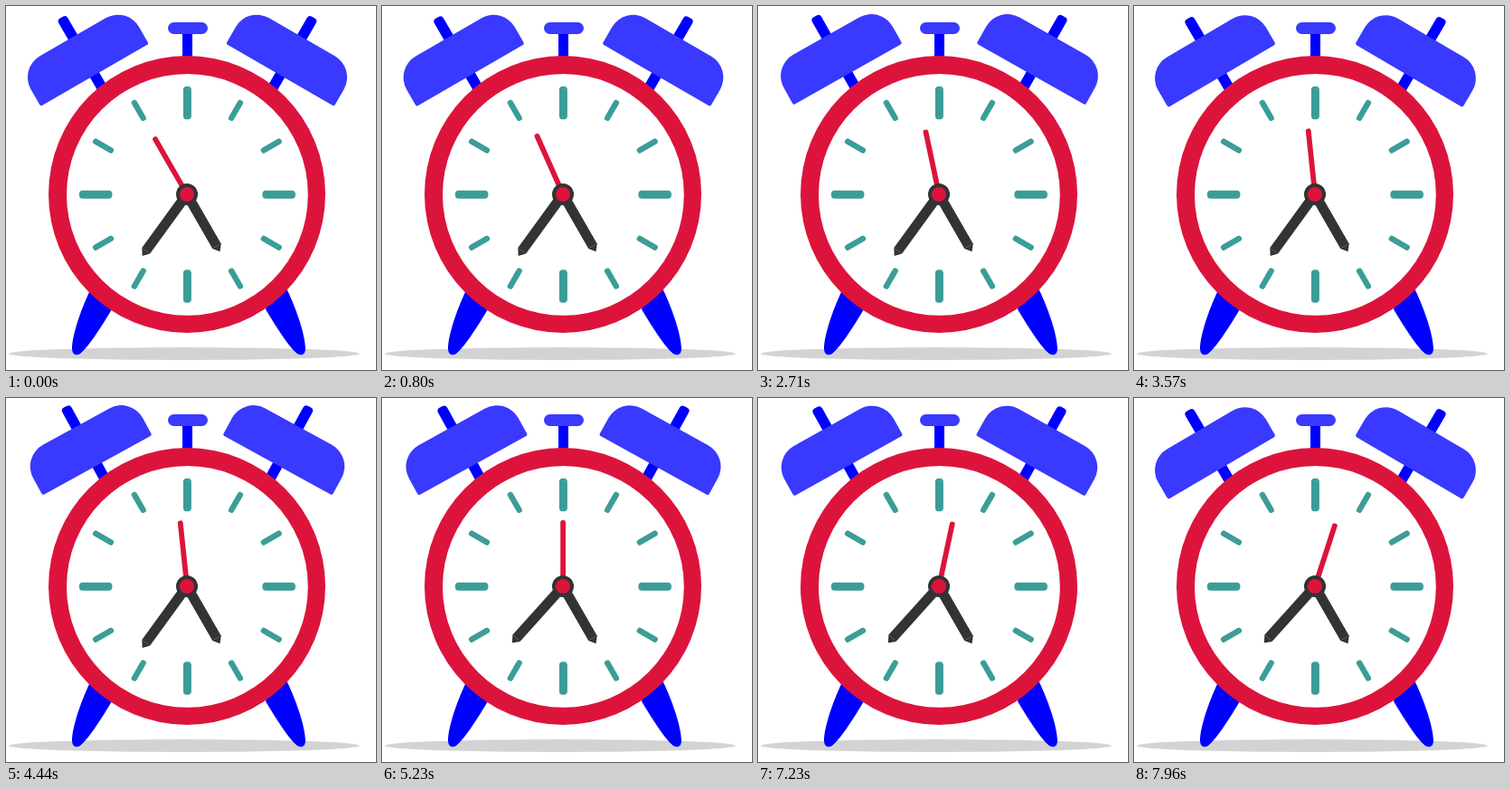
An HTML page for the animation above (8 s loop, 409x402 px).

```html
<!DOCTYPE html>
<html lang="en">
<head>
<meta charset="utf-8">
<title>Alarm clock</title>
<style>
  html, body { margin: 0; height: 100%; overflow: hidden; background: #fff; }
  svg { display: block; width: 100vw; height: 100vh; }
  .deep { fill: #00f; }
  .soft { fill: #3939ff; }
  .red { fill: #dc143c; }
  .tick { fill: #3b9d98; }
  .hand { fill: #333; }
  .seam { stroke: #777; stroke-width: .6; }
</style>
</head>
<body>
<svg viewBox="0 0 409 402">
  <defs>
    <g id="bell" transform="translate(97.8 75.9) rotate(-30)">
      <rect class="deep" x="-5.8" y="-73" width="11.6" height="100" rx="4"/>
      <path class="soft" d="M-69-2V-21a27 27 0 0 1 27-27H42a27 27 0 0 1 27 27V-2q0 2.5-2 2.5H-67q-2 0-2-2.5z"/>
    </g>
    <path id="leg" class="deep" d="M93.5 313C85 330 73 362 73 379Q74 388 82 384C92 376 106 353 117 335L112 310z"/>
  </defs>

  <ellipse cx="197" cy="384" rx="194" ry="7" fill="#d3d3d3"/>
  <use href="#leg"/>
  <use href="#leg" transform="translate(404 0) scale(-1 1)"/>

  <g id="leftBell"><use href="#bell"/></g>
  <g transform="translate(401 0) scale(-1 1)"><g id="rightBell"><use href="#bell"/></g></g>

  <rect class="deep" x="195" y="28" width="11" height="32"/>
  <rect class="soft" x="179" y="18" width="44" height="13" rx="6.5"/>

  <circle class="red" cx="200" cy="208" r="153"/>
  <circle cx="200.4" cy="208.4" r="133.4" fill="#fff"/>
  <g id="ticks" transform="translate(200.4 208.2)"></g>

  <g transform="translate(200 208)">
    <g transform="rotate(150)">
      <path class="hand" d="M-5.5 0V-66L0-73L5.5-66V0z"/>
      <path class="seam" d="M-4-66H4"/>
    </g>
    <g id="minute">
      <path class="hand" d="M-5.5 0V-77L0-84L5.5-77V0z"/>
      <path class="seam" d="M-4-77H4"/>
    </g>
    <rect id="second" class="red" x="-2.8" y="-73" width="5.8" height="73" rx="2.4"/>
    <circle class="red" r="10" stroke="#333" stroke-width="4"/>
  </g>
</svg>
<script>
  const LOOP = 8000, STEP = 66.3;        // ms
  const FIRST_TICK = 530, SHAKE = 200, SHAKE_LOW = 168;
  const byId = id => document.getElementById(id);
  const rotate = (id, angle, pivot = '') =>
    byId(id).setAttribute('transform', `rotate(${angle} ${pivot})`);

  for (let i = 0; i < 12; i++) {
    const [outer, length, width] = i % 3 ? [120, 25.5, 6.4] : [119.5, 36.5, 9];
    byId('ticks').insertAdjacentHTML('beforeend',
      `<rect class="tick" x="${-width / 2}" y="${-outer}" width="${width}" height="${length}"
        rx="${width * 0.43}" transform="rotate(${i * 30})"/>`);
  }

  function draw(time) {
    // The picture advances about fifteen times a second.
    const t = Math.floor((time % LOOP) / STEP + 0.2) * STEP;
    const ticks = Math.floor((t - FIRST_TICK) / 1000) + 1;
    const swing = 0.55 - Math.cos((t - SHAKE_LOW) / SHAKE * 2 * Math.PI);

    rotate('second', -30 + 6 * ticks);
    rotate('minute', ticks < 5 ? 216 : 222);
    rotate('leftBell', swing, '200 208');
    rotate('rightBell', swing, '200 208');
  }

  const start = performance.now();
  function frame() {
    draw(performance.now() - start);
    requestAnimationFrame(frame);
  }
  frame();
</script>
</body>
</html>
```
